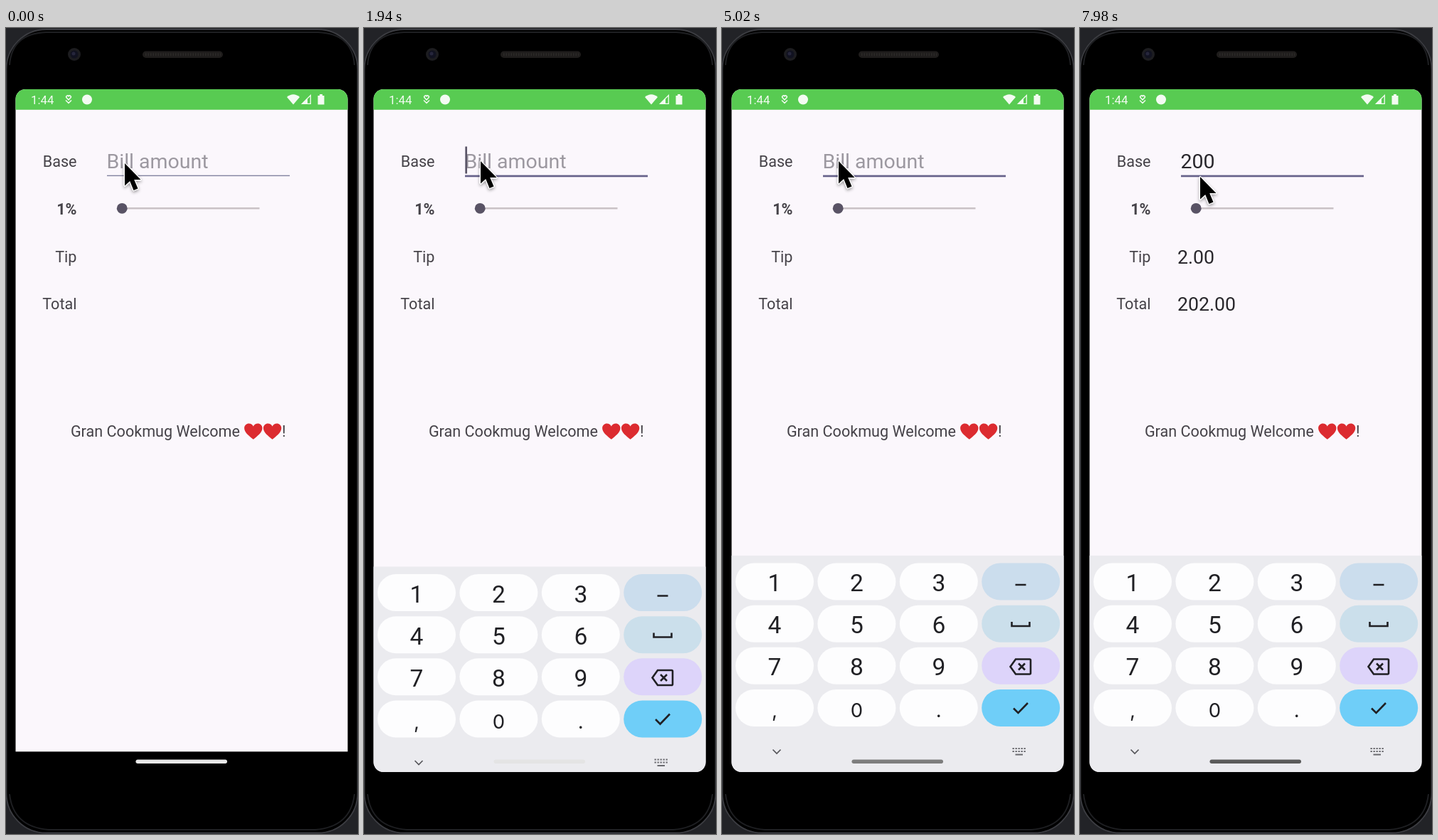
An HTML page that plays this animation: 495x1132 px, repeating every 8000 ms.

```html
<!DOCTYPE html>
<html lang="en">
<head>
<meta charset="utf-8">
<title>Tip calculator</title>
<style>
  html, body { margin: 0; width: 100%; height: 100%; overflow: hidden; background: #222327; }
  svg { display: block; width: 495px; height: 1132px; font-family: Roboto, sans-serif; }
  .label { font-size: 21.6px; fill: #454248; text-anchor: end; }
  .value { font-size: 26.7px; fill: #29272c; }
  .entry { font-size: 28.5px; }
  .key { font-size: 33.5px; fill: #202024; text-anchor: middle; }
  .small { font-family: Inter, sans-serif; font-size: 27.5px; }
  .line { fill: none; stroke: #202024; stroke-width: 2.6; }
</style>
</head>
<body>
<svg viewBox="0 0 495 1132">
  <defs>
    <clipPath id="screen"><rect x="13.5" y="86" width="467" height="959" rx="14"/></clipPath>
    <filter id="shade" x="-50%" y="-30%" width="220%" height="180%">
      <feDropShadow dx="0" dy="2" stdDeviation="2" flood-opacity=".4"/>
    </filter>
    <path id="heart" d="M0 11.3C-5 7-12.7 2-12.7-4.500C-12.7-8.500-9.500-11-6.300-11C-3.500-11-1.200-9.500 0-7C1.200-9.500 3.500-11 6.300-11C9.500-11 12.700-8.500 12.700-4.500C12.700 2 5 7 0 11.300Z" fill="#dc2b30"/>
  </defs>

  <!-- phone body -->
  <rect width="495" height="1132" fill="#222327"/>
  <rect x=".5" y="2" width="494" height="1128.500" rx="56" stroke="#3c3d42" stroke-width="1.800"/>
  <path d="M5 52Q8 8 56 6H439Q487 8 490 52M5 1076Q10 1122 60 1126H435Q485 1122 490 1076" fill="none" stroke="#1e1f22" stroke-width="2"/>
  <circle cx="96" cy="37" r="9" fill="#1d1d20"/>
  <circle cx="96" cy="37" r="5.500" fill="#111220"/>
  <circle cx="95" cy="36" r="2.500" fill="#26263c"/>
  <rect x="192" y="32.500" width="113" height="9.500" rx="4.700" fill="#1f1d1c"/>
  <path d="M196 37.300H302" stroke="#2c2a28" stroke-width="4" stroke-dasharray="1.500 2"/>

  <g clip-path="url(#screen)">
    <rect x="13" y="86" width="468" height="959" fill="#fbf7fc"/>
    <rect x="13" y="86" width="468" height="28.800" fill="#58cb52"/>
    <g fill="#f3fbf2">
      <text x="35" y="106.500" font-size="16.800">1:44</text>
      <path d="M88 101L85 97.800A1.800 1.800 0 0 1 88 95.800A1.800 1.800 0 0 1 91 97.800ZM84 101.500L88 105.500L92 101.500" fill="none" stroke="#f3fbf2" stroke-width="1.500"/>
      <circle cx="114" cy="100.500" r="7"/>
      <path d="M395 97Q404 89.500 413 97L404 107.500Z"/>
      <path d="M424 98.500V107H415.500Z"/>
      <path d="M428.300 94.500V106.300H416.500Z" fill="none" stroke="#f3fbf2" stroke-width="1.300"/>
      <path d="M438.500 95H441V93H445V95H447.500V107.500H438.500Z"/>
    </g>

    <text class="label" x="99.500" y="194.800">Base</text>
    <text class="label" x="99.500" y="261.800" font-weight="700">1%</text>
    <text class="label" x="99.500" y="328.600">Tip</text>
    <text class="label" x="99.500" y="395.400">Total</text>
    <text class="entry" id="hint" x="141.500" y="196.800" fill="#9c98a0">Bill amount</text>
    <text class="value entry" id="base" x="141.500" y="196.800"></text>
    <text class="value" id="tip" x="137" y="330.500"></text>
    <text class="value" id="total" x="137" y="397.300"></text>
    <rect id="underline" x="142" width="257"/>
    <rect id="caret" y="166.500" width="2.700" height="38" fill="#5b5668"/>
    <path d="M163 253.300H356.500" stroke="#cac2c6" stroke-width="2.500"/>
    <circle cx="163.200" cy="253.300" r="7.400" fill="#595365"/>

    <text class="label" x="329" y="574">Gran Cookmug Welcome</text>
    <use href="#heart" x="347.800" y="566.500"/>
    <use href="#heart" x="374.600" y="566.500"/>
    <text class="label" x="393.500" y="574">!</text>

    <g id="keyboard">
      <rect x="13" y="741" width="468" height="304" fill="#ebebef"/>
      <g id="keys"></g>
      <path class="line" d="M412.500 782H427.500"/>
      <path class="line" d="M407.500 834V840H432.500V834"/>
      <path class="line" d="M413 886.500H432.500Q434 886.500 434 888V906Q434 907.500 432.500 907.500H413L405.500 897ZM417 892.500L426 901.500M426 892.500L417 901.500"/>
      <path class="line" d="M410 955.500L416.500 962L430 948"/>
      <path d="M71.500 1013.500L77 1019L82.500 1013.500" fill="none" stroke="#57575c" stroke-width="1.700"/>
      <path d="M408.500 1012H427M408.500 1016H427" stroke="#6a6a6f" stroke-width="2.200" stroke-dasharray="2.300 1.700"/>
      <path d="M412.500 1020.500H423" stroke="#6a6a6f" stroke-width="2"/>
    </g>
  </g>
  <rect id="navbar" x="12" y="1016.300" width="470" height="30"/>
  <rect id="handle" x="182.500" y="1027.500" width="128.500" height="5.400" rx="2.700"/>
  <path id="pointer" d="M0 0V31.500L7.200 25L12.500 38L18.500 35.500L13.200 23H22.500Z" stroke="#fff" stroke-width="2.400" stroke-linejoin="round" paint-order="stroke" filter="url(#shade)"/>
</svg>
<script>
const LOOP = 8000, FOCUS = 1440, SLIDE = 1568, BLINK = 1000;
const typing = [[5560, '2'], [6080, '20'], [6480, '200']];
const pointerPath = [[0, 167, 190], [500, 164, 187], [7540, 164, 187], [7960, 169, 209]];
const handleShade = [[0, 233], [1800, 235], [2360, 209], [3900, 152], [5900, 104], [7980, 90]];

const $ = id => document.getElementById(id);
const clamp = v => Math.max(0, Math.min(1, v));

function track(points, t, column = 1) {
  const i = points.findIndex(p => p[0] > t);
  if (i < 0) return points[points.length - 1][column];
  const a = points[i - 1], b = points[i];
  return a[column] + (b[column] - a[column]) * (t - a[0]) / (b[0] - a[0]);
}

function buildKeys() {
  const sideFills = ['#cbdded', '#cbdfeb', '#ddd4fa', '#6fcef8'];
  const rows = ['123', '456', '789', ',0.'];
  $('keys').innerHTML = rows.map((row, r) => [0, 1, 2, 3].map(c => {
    const x = 19 + 115.4 * c, y = 751.6 + 59.1 * r;
    const last = r === 3;
    const label = c < 3
      ? `<text class="key${last ? ' small' : ''}" x="${x + 55}" y="${y + 39.5}">${row[c]}</text>` : '';
    return `<rect x="${x}" y="${y}" width="110" height="52" rx="26" fill="${c < 3 ? '#fdfdfe' : sideFills[r]}"/>${label}`;
  }).join('')).join('');
}

function draw(t) {
  const typed = typing.filter(([at]) => at <= t).pop();
  const text = typed ? typed[1] : '';
  const focused = t >= FOCUS;

  $('hint').style.display = text ? 'none' : '';
  $('base').textContent = text;
  $('tip').textContent = text && (text * 0.01).toFixed(2);
  $('total').textContent = text && (text * 1.01).toFixed(2);

  $('underline').setAttribute('y', focused ? 206.6 : 206.7);
  $('underline').setAttribute('height', focused ? 2.7 : 1.4);
  $('underline').setAttribute('fill', focused ? '#66618a' : '#8182a0');

  const sinceEdit = t - (typed ? typed[0] : FOCUS);
  const caretOn = focused && Math.floor(sinceEdit / BLINK) % 2 === 0;
  $('caret').setAttribute('x', 142.3 + text.length * 15.6);
  $('caret').style.display = caretOn ? '' : 'none';

  const slide = 1 - (1 - clamp((t - SLIDE) / 570)) ** 2.8;
  $('keyboard').setAttribute('transform', `translate(0 ${304 * (1 - slide)})`);
  $('keyboard').setAttribute('opacity', clamp(slide * 1.1));
  $('navbar').setAttribute('opacity', 1 - clamp((t - SLIDE) / 305));

  const shade = Math.round(track(handleShade, t));
  $('handle').setAttribute('fill', `rgb(${shade},${shade},${shade})`);
  $('pointer').setAttribute('transform',
    `translate(${track(pointerPath, t)} ${track(pointerPath, t, 2)})`);
}

buildKeys();
const start = performance.now();
function tick() {
  draw((performance.now() - start) % LOOP);
  requestAnimationFrame(tick);
}
draw(0);
requestAnimationFrame(tick);
</script>
</body>
</html>
```
